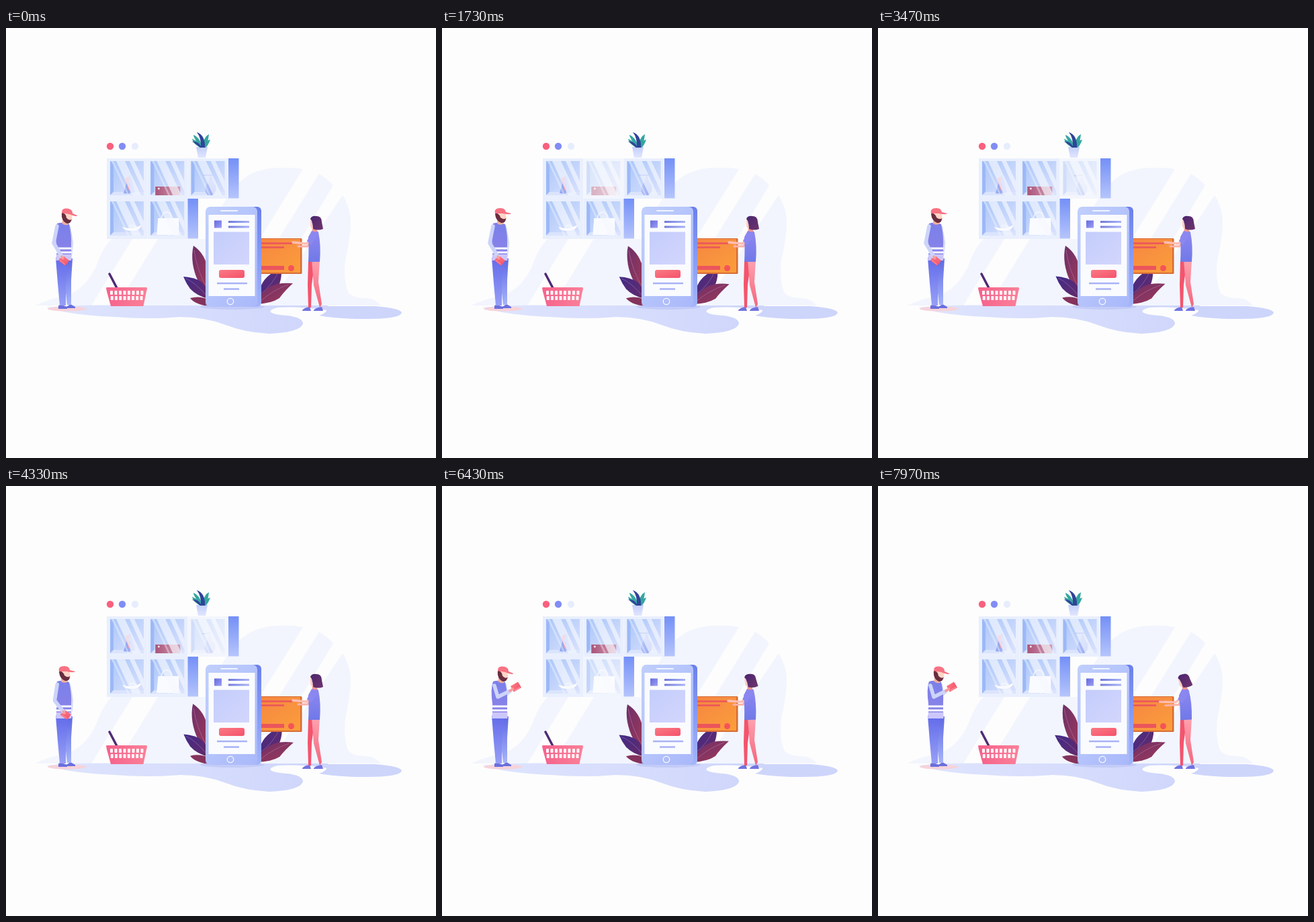
Animation of 640 by 640 pixels, one loop 8 s. Source, as an HTML page:

```html
<!DOCTYPE html>
<html lang="en">
<head>
<meta charset="utf-8">
<title>Mobile shopping</title>
<style>
html,body{margin:0;width:100%;height:100%;overflow:hidden;background:#fdfdfd}
svg{display:block;width:100%;height:100%}
.line{fill:none;stroke-linecap:round;stroke-linejoin:round}
</style>
</head>
<body>
<svg viewBox="0 0 640 640">
<defs id="defs"></defs>

<!-- backdrop -->
<g fill="#f2f5fd">
  <path d="M43 413Q62 404 90 398Q118 389 134 355Q143 328 157 314H188L127 413Z"/>
  <path d="M165 413L226 314H300Q318 262 344 233Q366 209 405 208Q426 207 442 210L375 318V413Z"/>
  <path d="M466 217Q478 224 487 234L408 366L378 372V358Z"/>
  <path d="M501 249Q514 270 513 292Q512 316 505 346Q502 374 509 393Q516 402 535 402Q549 402 558 413H390Z"/>
</g>
<path d="M60 416Q110 411 180 413H478Q490 418 478 420Q440 414 405 416Q391 419 394 423Q399 427 419 428Q442 431 442 440Q438 453 392 455Q355 453 327 442Q296 430 258 430Q210 434 161 430Q97 427 74 419Z" fill="url(#ground)"/>
<path d="M466 428Q480 423 479 414H548Q588 417 589 424Q586 433 536 433Q490 433 466 428Z" fill="#ced5fb"/>

<!-- shelf -->
<g id="shelf"></g>
<rect x="331" y="194" width="15.500" height="59.500" fill="url(#side)"/>
<rect x="270.500" y="254" width="15.500" height="59.500" fill="url(#side)"/>
<circle cx="155" cy="176" r="5.200" fill="#f8607e"/>
<circle cx="173" cy="176" r="5.200" fill="#828df4"/>
<circle cx="192" cy="176" r="5.200" fill="#e7edfd"/>
<path d="M283 177H300L297 193H286Z" fill="url(#pot)"/>
<path d="M289 178Q278 172 277 165Q288 169 291 178ZM291 178Q279 164 279 159Q288 162 293 178ZM292 178Q294 162 302 158Q301 170 296 178ZM294 178Q296 168 304 166Q301 175 297 178Z" fill="#35a6a0"/>
<path d="M289 178Q281 171 277 169Q287 168 291 178ZM290 178Q291 164 284 155Q297 160 296 178Z" fill="#304399"/>

<!-- leaves -->
<g id="leafTop"><path d="M300 398Q282 377 278 351Q276 336 279 324Q297 336 301 362Z" fill="url(#wine)"/><path d="M280 331Q284 360 299 387" class="line" stroke="#a9638c" stroke-width=".8"/></g>
<g id="leafLeft"><path d="M302 403Q284 399 274 388Q268 380 264 370Q281 371 291 378Q300 385 302 403Z" fill="url(#plum)"/><path d="M268 373Q281 378 300 400" class="line" stroke="#8762a0" stroke-width=".8"/><path d="M301 414Q281 411 274 402Q288 398 301 404Z" fill="#84335c"/></g>
<g id="leafBack"><path d="M374 410Q375 380 393 367Q405 356 409 354Q413 376 400 393Z" fill="url(#plum)"/><path d="M377 398Q398 382 407 359" class="line" stroke="#8462a3" stroke-width=".8"/></g>
<g id="leafRight"><path d="M373 411Q383 386 403 381Q414 379 427 380Q414 392 407 402Q395 410 373 411Z" fill="url(#wine)"/><path d="M377 408Q397 390 420 382" class="line" stroke="#ad6388" stroke-width=".8"/></g>

<!-- bank card -->
<g id="card">
  <rect x="366" y="313" width="74.500" height="53" rx="1.500" fill="#d66c36"/>
  <rect x="366" y="314" width="72" height="50" fill="url(#card)"/>
  <path d="M376 320.500H426M376 326.500H414" stroke="#eb555c" stroke-width="2.500"/>
  <path d="M376 357H414" stroke="#eb555c" stroke-width="6"/>
  <circle cx="424.500" cy="357.500" r="4.500" fill="#f65358"/>
</g>

<!-- phone -->
<ellipse cx="337" cy="415" rx="48" ry="4" fill="#bcc5f5" opacity=".7"/>
<rect x="304" y="266" width="76" height="149" rx="6" fill="url(#phoneSide)"/>
<rect x="297" y="266" width="77" height="149" rx="7" fill="url(#phone)"/>
<rect x="301.500" y="278" width="69" height="121" fill="#fafbff"/>
<path d="M320 272H344" class="line" stroke="#f0f4ff" stroke-width="2"/>
<circle cx="334" cy="407" r="4.700" fill="#b0bdfa" stroke="#f7faff" stroke-width="1.300"/>
<rect x="310" y="286.500" width="11" height="11" fill="url(#purple)"/>
<path d="M331 288.500H362M331 296H362" stroke="url(#lines)" stroke-width="3"/>
<rect x="309" y="303.500" width="53" height="48.500" fill="url(#photo)"/>
<rect x="317" y="360" width="38" height="12" rx="3" fill="url(#button)"/>
<path d="M314 380H359M324 388.500H347" stroke="#a9b2f5" stroke-width="2.500"/>

<!-- basket -->
<path d="M154 366L165 387" class="line" stroke="#4f2a74" stroke-width="3.500"/>
<path d="M149 387Q149 386 151 386H209Q211 387 209 392L204.500 414H156L150 392Z" fill="url(#basket)"/>
<g id="slots" fill="#fff6f9"></g>

<!-- man -->
<ellipse cx="91" cy="418" rx="29" ry="3.400" fill="#f6d3da"/>
<path d="M78 416Q77 412 82 412L91 415V418H78ZM90 415L96 411L103 415V417H90Z" fill="#6a6fdd"/>
<path d="M87 343H99L97 375V412H91L87 377Z" fill="url(#legBack)"/>
<path d="M74 342H93L89 382V413H80L77 380Z" fill="url(#legFront)"/>
<path id="backArm" class="line" stroke="#d5dbfb" stroke-width="4.500"/>
<path d="M76 291Q85 288 94 292Q98 309 97 324V346H75V324Q72 302 76 291Z" fill="url(#vest)"/>
<path d="M74.500 328H97.500M74.500 334H97.500" stroke="#f8f9ff" stroke-width="3"/>
<path d="M75 337H97.500V346H74Z" fill="#ccc7fa"/>
<g id="manHead">
  <path d="M82 283L90 285L91 292Q85 294 82 291Z" fill="#f3ae9f"/>
  <path d="M80 275H94L96 284Q94 290 87 289Q80 286 80 275Z" fill="#ffd5c6"/>
  <path d="M80 275Q86 277 87 282Q92 286 95 283Q95 291 88 290Q80 287 79 277Z" fill="#692d40"/>
  <path d="M79 276Q77 268 87 268Q94 268 95 274L103 276Q101 278.500 90 276Z" fill="#f77283"/>
</g>
<g id="book"><rect x="-6.500" y="-5" width="13" height="10" rx="1" fill="url(#button)"/><path d="M-5 3.500H5" stroke="#fb9aa2" stroke-width="1"/></g>
<path id="frontArm" class="line" stroke="#cdd4fa" stroke-width="5.500"/>
<path id="hand" class="line" stroke="#fb9b98" stroke-width="3.500"/>

<!-- woman -->
<path d="M441 420Q444 416 452 415L454 421H441ZM458 420Q461 416 470 415L472 421H458Z" fill="#7173df"/>
<path d="M450 346H460L455 382L454 416H450L449 382Z" fill="#f4546e"/>
<path d="M455 345H467L465 378L470 411L467 416L458 383Z" fill="url(#skin)"/>
<g id="woman">
  <path id="farArm" class="line" stroke="#fcb2a8" stroke-width="3"/>
  <path d="M455 302Q462 299 465 304Q469 323 467 348H450Q451 327 450 311Z" fill="url(#blouse)"/>
  <path id="nearArm" class="line" stroke="#febdb3" stroke-width="3.300"/>
  <path d="M455 303Q463 302 463 310L454 323L448 317Z" fill="#8b87f0"/>
  <g id="womanHead">
    <path d="M455 292H463V303Q458 304 456 302Z" fill="#f2958f"/>
    <path d="M453 284H463V298Q455 301 453 295Z" fill="#ffcec2"/>
    <path d="M453 284Q455 279 462 280Q470 280 470 289L472 299Q465 302 457 299Q457 293 455 287Z" fill="url(#hair)"/>
  </g>
</g>
</svg>
<script>
const LOOP = 8000;
const $ = id => document.getElementById(id);

const gradients = {
  ground: ['#dfe5fd', '#ced5fb', 1, 0], side: ['#7490f7', '#b6c5fc', 0, 1],
  pot: ['#c3d0fc', '#e1e5fe', 0, 1], wine: ['#6c2f68', '#a03a5a', 1, 1],
  plum: ['#412a88', '#662b68', 1, 1], card: ['#f58443', '#fb9e3b', 1, 1],
  phone: ['#c0cffc', '#a9b8fa', 1, 1], phoneSide: ['#6b80ec', '#a3b5f9', 0, 1],
  purple: ['#6569db', '#9c9ff6', 1, 1], lines: ['#7079d8', '#aab4f8', 1, 0],
  photo: ['#c3cdfb', '#d3d6fd', 1, 1], button: ['#fa7a83', '#f5526c', 1, 1],
  basket: ['#f5628c', '#fa8098', 1, 0], legBack: ['#5d68e2', '#a6b4fa', 0, 1],
  legFront: ['#626bea', '#979ff6', 0, 1], vest: ['#7a80ea', '#8d83e8', 0, 1],
  skin: ['#fca3b0', '#f4657c', 0, 1], blouse: ['#8f88f0', '#7079e8', 0, 1],
  hair: ['#4a2570', '#6f356d', 1, 1], cell: ['#aac6f9', '#dbe2fd', 1, 1],
  parcel: ['#a9547a', '#d59bb2', 1, 0], vase: ['#bac8fa', '#98aaf3', 1, 1]
};
$('defs').innerHTML = Object.entries(gradients).map(([id, [from, to, x, y]]) =>
  `<linearGradient id="${id}" x1="0" y1="0" x2="${x}" y2="${y}"><stop stop-color="${from}"/><stop offset="1" stop-color="${to}"/></linearGradient>`
).join('');

// Shelf goods use coordinates relative to their cell.
const goods = [
  '<path d="M28 52L31 28Q34 22 36 29L42 51Z" fill="#b3c3fa"/><path d="M25 52L30 34L35 39L34 53Z" fill="#93a9f0"/><circle cx="31" cy="31" r="3" fill="#efa5b0"/><path d="M30 34L34 47" class="line" stroke="#eda5b8" stroke-width="3"/>',
  '<rect x="12" y="42" width="37" height="13" fill="url(#parcel)"/><circle cx="17" cy="45" r="1.500" fill="#ffe4e8"/>',
  '<path d="M24 25H36" class="line" stroke="#849be9" stroke-width="1.500"/><path d="M32 27H36Q36 35 41 40Q44 51 36 55H30Q23 50 28 39Q32 34 32 27Z" fill="url(#vase)"/>',
  '<path d="M23 42Q37 47 52 39Q49 48 38 48Q26 48 23 42Z" fill="#fdfcfb"/><path d="M34 42Q38 37 43 42" class="line" stroke="#eff1f9" stroke-width="2"/>',
  '<path d="M21 30Q22 20 29 20Q36 20 36 30" class="line" stroke="#f4f6fd" stroke-width="1.500"/><path d="M16 29H47V54H14Z" fill="#fafbff"/>'
];
$('shelf').innerHTML = goods.map((item, i) => {
  const x = 150 + 60.3 * (i % 3), y = i < 3 ? 194 : 254;
  return `<g transform="translate(${x} ${y})">
    <rect width="60" height="60" fill="#e9effd"/>
    <rect x="5" y="4" width="50" height="51" fill="url(#cell)"/>
    <path d="M5 4L10 9V50L5 55Z" fill="#9cb8f7"/><path d="M5 55L10 50H55V55Z" fill="#dbe4fd"/>
    <g id="item${i}">${item}</g>
    <path d="M14 4H27L51 55H38ZM34 4H41L55 34V49Z" fill="#f6f9ff" opacity=".66"/>
    <path d="M7 4H10L34 55H31Z" fill="#f6f9ff" opacity=".38"/>
    <rect id="veil${i}" width="60" height="60" fill="#fdfdfd"/>
  </g>`;
}).join('');

let slots = '';
for (let row = 0; row < 2; row++) for (let col = 0; col < 8; col++) {
  const x = 155 + col * 6.5 + row * (3 - col) * .25;
  slots += `<rect x="${x}" y="${391 + row * 8}" width="4" height="6" rx=".7"/>`;
}
$('slots').innerHTML = slots;

// Eased interpolation through time/value pairs.
function key(t, ...pairs) {
  let i = 0;
  while (i < pairs.length - 2 && t > pairs[i + 1][0]) i++;
  const [a, from] = pairs[i], [b, to] = pairs[i + 1];
  const p = Math.min(1, Math.max(0, (t - a) / (b - a)));
  return from + (to - from) * p * p * (3 - 2 * p);
}
const move = (id, value) => $(id).setAttribute('transform', value);
const path = (id, ...points) => $(id).setAttribute('d', 'M' + points.map(p => p.join(' ')).join('L'));
const mix = (a, b, p) => a.map((v, i) => v + (b[i] - v) * p);

function drawMan(t) {
  const raise = key(t, [4050, 0], [4330, .12], [5150, 1]);
  const wrist = mix([83, 340], [101, 305], raise);
  const elbow = mix([71, 320], [83, 314], raise);
  const book = mix([86, 346], [110, 299], raise);
  path('frontArm', mix([76, 295], [78, 297], raise), elbow, wrist);
  path('hand', wrist, mix(wrist, book, .5));
  path('backArm', [94, 296], mix([98, 320], [96, 311], raise), mix([96, 338], [103, 304], raise));
  move('book', `translate(${book}) rotate(${key(raise, [0, 38], [1, -30])})`);
  const tilt = key(t, [0, 1], [850, 0], [4350, 0], [5150, 1]);
  move('manHead', `translate(${tilt * 1.5} 0) rotate(${tilt * 10} 85 290)`);
}

function drawWoman(t) {
  const push = key(t, [4400, 0], [5370, 1.5], [6430, -.5], [7970, -6]);
  const lean = key(t, [5370, 0], [6430, -3], [7970, -7]);
  move('card', `translate(${push} 0)`);
  path('farArm', [454, 315], [449, 325], [435 + push, 325]);
  path('nearArm', [456, 313], [447 + push * .4, 321], [427 + push, 319]);
  move('woman', `rotate(${lean * .45} 458 348)`);
  move('womanHead', `rotate(${lean * 1.5} 459 302)`);
}

function drawLeaves(t) {
  move('leafTop', `rotate(${key(t, [0, 0], [1730, -1.6], [2530, .7], [4330, -.6], [5370, -1.7], [6430, -2.4], [7970, -2.4])} 300 398)`);
  move('leafLeft', `rotate(${key(t, [0, 0], [1730, -.4], [2530, 1], [4330, .6], [5370, -1.4], [6430, -.7], [7970, -1.3])} 302 408)`);
  move('leafBack', `rotate(${1.5 * Math.sin(t / 620)} 375 410)`);
  move('leafRight', `rotate(${key(t, [0, 0], [1730, 1.2], [2530, -.2], [4330, 1.8], [5370, .5], [6430, -.2], [7970, 1.7])} 373 411)`);
}

function drawShelf(t) {
  const veils = [
    0,
    key(t, [900, 0], [1350, .55], [1750, .55], [2300, 0]),
    key(t, [1900, 0], [2450, .55], [5850, .55], [6350, 0]),
    0,
    key(t, [5900, 0], [6400, .4], [6650, .4], [7300, 0])
  ];
  veils.forEach((value, i) => $('veil' + i).setAttribute('opacity', value));
  move('item2', `rotate(${key(t, [2530, 0], [3300, -5], [4200, -5], [5000, -2], [6200, 0])} 34 55)`);
}

function frame(now) {
  const t = now % LOOP;
  drawShelf(t);
  drawLeaves(t);
  drawMan(t);
  drawWoman(t);
  requestAnimationFrame(frame);
}
requestAnimationFrame(frame);
</script>
</body>
</html>
```
